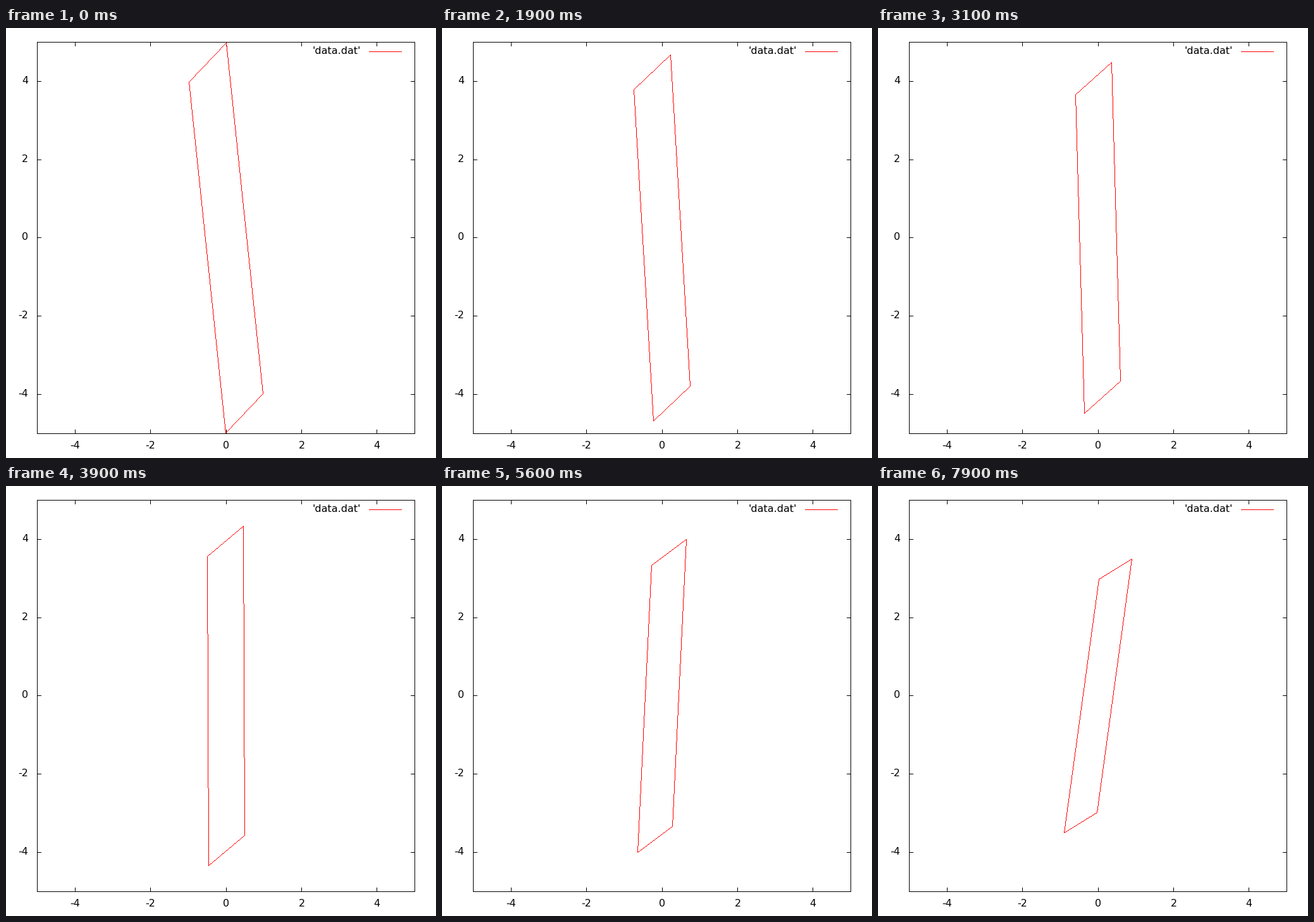
A matplotlib script for the animation above (8000 ms loop, 680 by 680 pixels).

```python
import numpy as np
import matplotlib.pyplot as plt
from matplotlib.animation import FuncAnimation

SIZE = 680
LEFT, RIGHT, TOP, BOTTOM = 49, 646, 22, 641
FRAMES, INTERVAL = 80, 100
BLACK, RED = (0, 0, 0), (255, 0, 0)
TICKS = (-4, -2, 0, 2, 4)
TICK_LEN = 6

# Self-similar spiral collapse towards the centre
DECAY = 0.006
SWIRL = 0.385
CORNERS = np.array([5j, -1 + 4j, -5j, 1 - 4j])


def to_px(x, y):
    """Map plot coordinates to whole pixel columns and rows."""
    col = LEFT + (x + 5) * (RIGHT - LEFT) / 10
    row = BOTTOM - (y + 5) * (BOTTOM - TOP) / 10
    return int(np.floor(col + 0.5)), int(np.ceil(row - 0.5))


def line(img, p, q, color):
    """Draw a hard one-pixel line."""
    n = max(abs(q[0] - p[0]), abs(q[1] - p[1])) + 1
    cols = np.floor(np.linspace(p[0], q[0], n) + 0.5).astype(int)
    rows = np.floor(np.linspace(p[1], q[1], n) + 0.5).astype(int)
    img[rows, cols] = color


def outline(img, pts, color):
    for p, q in zip(pts, pts[1:] + pts[:1]):
        line(img, p, q, color)


def make_base():
    img = np.full((SIZE, SIZE, 3), 255, np.uint8)
    outline(img, [(LEFT, TOP), (RIGHT, TOP), (RIGHT, BOTTOM), (LEFT, BOTTOM)], BLACK)
    for v in TICKS:
        col, row = to_px(v, v)
        line(img, (col, TOP), (col, TOP + TICK_LEN), BLACK)
        line(img, (col, BOTTOM - TICK_LEN), (col, BOTTOM), BLACK)
        line(img, (LEFT, row), (LEFT + TICK_LEN, row), BLACK)
        line(img, (RIGHT - TICK_LEN, row), (RIGHT, row), BLACK)
    line(img, (574, 37), (625, 37), RED)
    return img


def corners(step):
    left = 1 - DECAY * step
    turn = np.sqrt(left) * np.exp(1j * SWIRL * np.log(left))
    return [to_px(z.real, z.imag) for z in CORNERS * turn]


fig = plt.figure(figsize=(8.5, 8.5), dpi=80, facecolor="white")
ax = fig.add_axes([0, 0, 1, 1])
ax.axis("off")

base = make_base()
canvas = ax.imshow(base, extent=(0, SIZE, SIZE, 0), interpolation="nearest", aspect="auto")
ax.set_xlim(0, SIZE)
ax.set_ylim(SIZE, 0)

font = dict(family="DejaVu Sans", fontsize=14.4, color="black", va="baseline")
for v in TICKS:
    col, row = to_px(v, v)
    ax.text(col + 0.5, 665, str(v), ha="center", **font)
    ax.text(35.5, row + 4, str(v), ha="right", **font)
ax.text(561.5, 41, "'data.dat'", ha="right", **font)


def update(i):
    img = base.copy()
    outline(img, corners(i + 1), RED)
    canvas.set_data(img)
    return (canvas,)


anim = FuncAnimation(fig, update, frames=FRAMES, interval=INTERVAL, repeat=True, repeat_delay=0)
plt.show()
```
